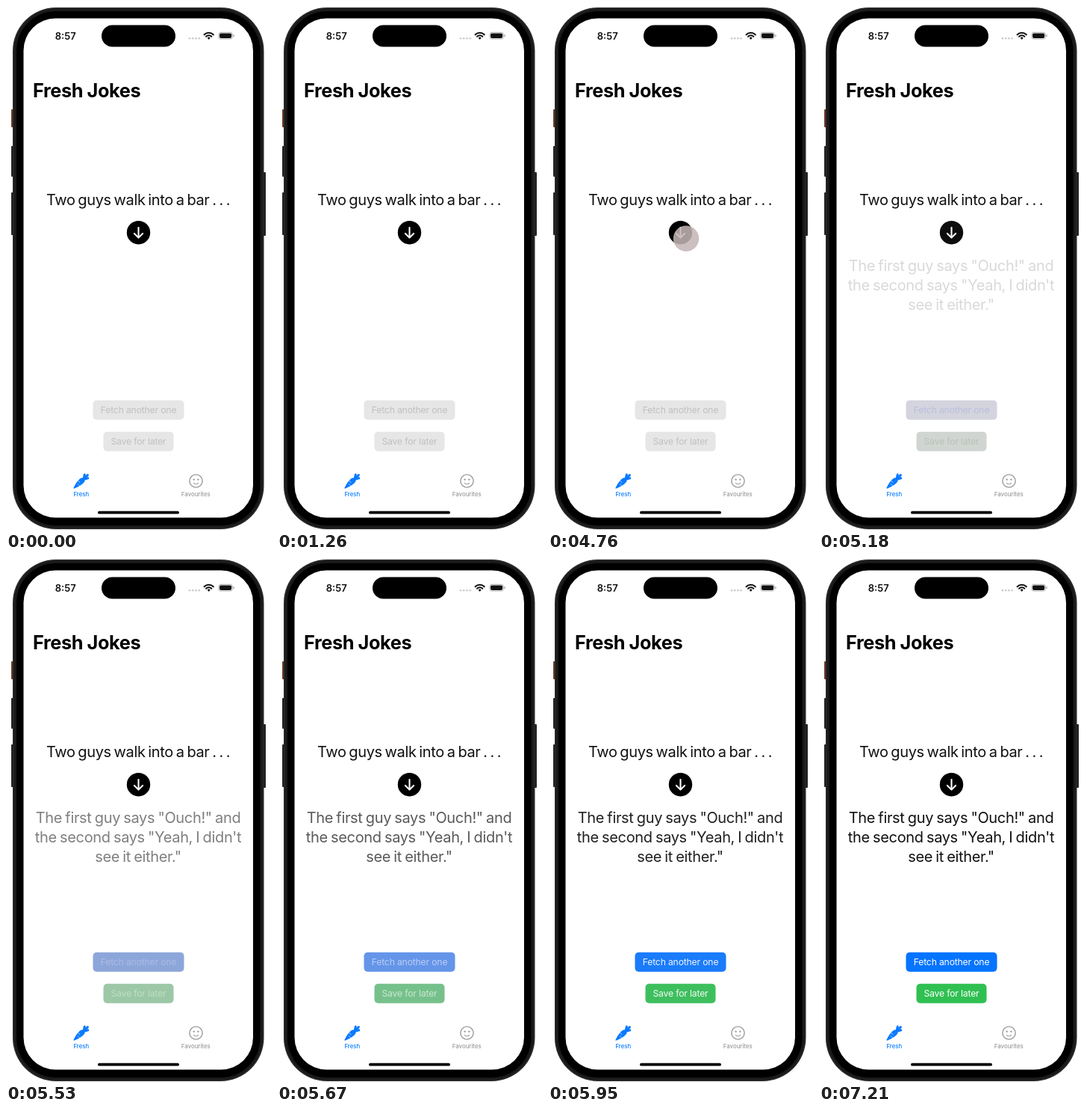
Animation, 355 px wide and 700 px high, one loop 8000 ms. Source, as an HTML page with a canvas:

```html
<!DOCTYPE html>
<html lang="en">
<head>
<meta charset="utf-8">
<title>Fresh Jokes</title>
<style>
html, body { margin: 0; width: 100%; height: 100%; overflow: hidden; background: #fff; }
canvas { display: block; }
</style>
</head>
<body>
<canvas id="stage"></canvas>
<script>
const W = 355, H = 700, LOOP = 8000;
const canvas = document.getElementById('stage');
const ctx = canvas.getContext('2d');
const dpr = window.devicePixelRatio || 1;
canvas.width = W * dpr;
canvas.height = H * dpr;
canvas.style.width = W + 'px';
canvas.style.height = H + 'px';

const BLUE = '#0a7aff', GRAY = '#999';
const clamp = v => Math.min(1, Math.max(0, v));
const span = (t, a, b) => clamp((t - a) / (b - a));
const smooth = u => u * u * (3 - 2 * u);

// Disabled-to-enabled colours pass through a muted blend.
const STOPS = [0, 0.16, 0.53, 0.77, 1];
const FETCH = {
  fill: [[230, 230, 231], [212, 212, 222], [143, 167, 217], [80, 140, 240], [5, 116, 255]],
  ink: [[192, 192, 194], [186, 190, 222], [170, 187, 226], [196, 214, 249], [255, 255, 255]]
};
const SAVE = {
  fill: [[230, 230, 231], [209, 213, 209], [157, 200, 168], [100, 190, 125], [48, 192, 82]],
  ink: [[192, 192, 194], [185, 192, 186], [190, 222, 198], [208, 236, 216], [255, 255, 255]]
};

function blend(colors, p) {
  let i = 0;
  while (i < STOPS.length - 2 && p > STOPS[i + 1]) i++;
  const u = span(p, STOPS[i], STOPS[i + 1]);
  const mix = colors[i].map((c, k) => Math.round(c + (colors[i + 1][k] - c) * u));
  return `rgb(${mix})`;
}

function box(x, y, w, h, r, fill) {
  ctx.beginPath();
  ctx.roundRect(x, y, w, h, r);
  ctx.fillStyle = fill;
  ctx.fill();
}

function disc(x, y, r, fill) {
  ctx.beginPath();
  ctx.arc(x, y, r, 0, Math.PI * 2);
  ctx.fillStyle = fill;
  ctx.fill();
}

function line(points, color, width) {
  ctx.beginPath();
  points.forEach(([x, y]) => ctx.lineTo(x, y));
  ctx.strokeStyle = color;
  ctx.lineWidth = width;
  ctx.stroke();
}

function text(str, x, y, size, color, opt = {}) {
  ctx.font = `${opt.weight || 400} ${size}px Inter, "Liberation Sans", sans-serif`;
  ctx.letterSpacing = (opt.track || 0) + 'px';
  ctx.wordSpacing = (opt.word || 0) + 'px';
  ctx.textAlign = opt.align || 'center';
  ctx.fillStyle = color;
  ctx.fillText(str, x, y);
}

function phone() {
  box(7, 138, 4, 24, 1, '#6b3a2a');
  box(7, 187, 4, 41, 1, '#222');
  box(7, 249, 4, 57, 1, '#222');
  box(343, 222, 5, 85, 1, '#222');
  box(9, 2, 336.5, 697, 58, '#262626');
  box(11, 4, 332.5, 693, 56, '#191919');
  box(14, 7, 326.5, 687, 53, '#000');
  box(23.5, 16.5, 307.5, 667, 43, '#fff');
  box(128, 25.5, 99, 29, 14.5, '#000');
  box(123, 674.8, 109, 3.8, 1.9, '#000');
}

function statusBar() {
  text('8:57', 79.7, 44.7, 13, '#111', { weight: 600 });
  for (let i = 0; i < 4; i++) disc(246 + i * 4.2, 43.3, 1.3, '#c8c8c8');
  const a = Math.PI * 1.25, b = Math.PI * 1.75;
  [[8.6, 2.1], [5.2, 2]].forEach(([r, w]) => {
    ctx.beginPath();
    ctx.arc(271.7, 44.4, r, a, b);
    ctx.lineWidth = w;
    ctx.strokeStyle = '#111';
    ctx.stroke();
  });
  ctx.beginPath();
  ctx.moveTo(271.7, 44.9);
  ctx.arc(271.7, 44.4, 2.8, a, b);
  ctx.fillStyle = '#111';
  ctx.fill();
  ctx.beginPath();
  ctx.roundRect(284.8, 35.3, 18.6, 8.8, 2.8);
  ctx.strokeStyle = '#aaa';
  ctx.lineWidth = 0.9;
  ctx.stroke();
  box(286, 36.5, 16.2, 6.4, 1.8, '#111');
  box(304.4, 38.1, 1.3, 3.2, 0.6, '#aaa');
}

function carrot() {
  ctx.fillStyle = BLUE;
  ctx.beginPath();
  ctx.moveTo(90.3, 644);
  ctx.quadraticCurveTo(94, 636, 98.5, 632);
  ctx.quadraticCurveTo(101.5, 629, 104.5, 631);
  ctx.quadraticCurveTo(107, 634, 104, 637);
  ctx.quadraticCurveTo(99.5, 641.5, 91, 644.8);
  ctx.fill();
  line([[96.8, 634.6], [99, 636.6]], '#fff', 0.7);
  line([[98, 640.4], [96.2, 638.6]], '#fff', 0.7);
  line([[104, 631.8], [105.3, 626]], BLUE, 3);
  line([[104, 632], [109.4, 626.6]], BLUE, 3);
  line([[104, 632.3], [109.8, 630.8]], BLUE, 3);
}

function smiley() {
  ctx.strokeStyle = GRAY;
  ctx.lineWidth = 1.4;
  ctx.beginPath();
  ctx.arc(254.5, 634.5, 8.6, 0, Math.PI * 2);
  ctx.stroke();
  ctx.beginPath();
  ctx.arc(254.5, 635.2, 3.6, Math.PI * 0.2, Math.PI * 0.8);
  ctx.lineWidth = 1.1;
  ctx.stroke();
  disc(251.7, 632.6, 1.2, GRAY);
  disc(257.3, 632.6, 1.2, GRAY);
}

function tabs() {
  carrot();
  smiley();
  text('Fresh', 100.8, 655, 7.8, BLUE, { weight: 500 });
  text('Favourites', 254.3, 655, 7.8, GRAY, { weight: 500 });
}

function arrowButton(t) {
  const dim = 0.25 * span(t, 4760, 4900) * (1 - span(t, 4960, 5240));
  ctx.globalAlpha = 1 - dim;
  disc(177.5, 302.7, 15.7, '#000');
  ctx.globalAlpha = 1;
  line([[177.5, 296], [177.5, 309.2]], '#fff', 2.1);
  line([[171.9, 303.9], [177.5, 309.5], [183.1, 303.9]], '#fff', 2.1);
}

function touch(t) {
  if (t < 4760) return;
  ctx.globalAlpha = 0.86 * (1 - span(t, 4900, 5040));
  disc(185, 310.7, 17.2, '#c4b5b5');
  ctx.globalAlpha = 1;
}

function punchline(p) {
  const lines = ['The first guy says "Ouch!" and', 'the second says "Yeah, I didn\'t', 'see it either."'];
  ctx.globalAlpha = p;
  lines.forEach((s, i) => text(s, 177, 354.2 + i * 26, 20, '#111', { track: -0.35, word: -1 }));
  ctx.globalAlpha = 1;
}

function button(label, x, y, w, colors, p) {
  box(x, y, w, 26, 5, blend(colors.fill, p));
  text(label, x + w / 2, y + 17.3, 12.2, blend(colors.ink, p), { track: -0.17 });
}

function draw(t) {
  const p = smooth(span(t, 4850, 6150));
  ctx.setTransform(dpr, 0, 0, dpr, 0, 0);
  ctx.fillStyle = '#fff';
  ctx.fillRect(0, 0, W, H);
  ctx.lineCap = ctx.lineJoin = 'round';
  phone();
  statusBar();
  text('Fresh Jokes', 36, 121.5, 25.3, '#000', { weight: 700, track: -0.4, align: 'left' });
  text('Two guys walk into a bar . . .', 177, 266.2, 20, '#111', { track: -0.35, word: -1.5 });
  arrowButton(t);
  if (p > 0) punchline(p);
  button('Fetch another one', 116.5, 526.8, 122, FETCH, p);
  button('Save for later', 130.5, 568.8, 94, SAVE, p);
  tabs();
  touch(t);
}

const start = performance.now();
function frame() {
  draw((performance.now() - start) % LOOP);
  requestAnimationFrame(frame);
}
frame();
</script>
</body>
</html>
```
